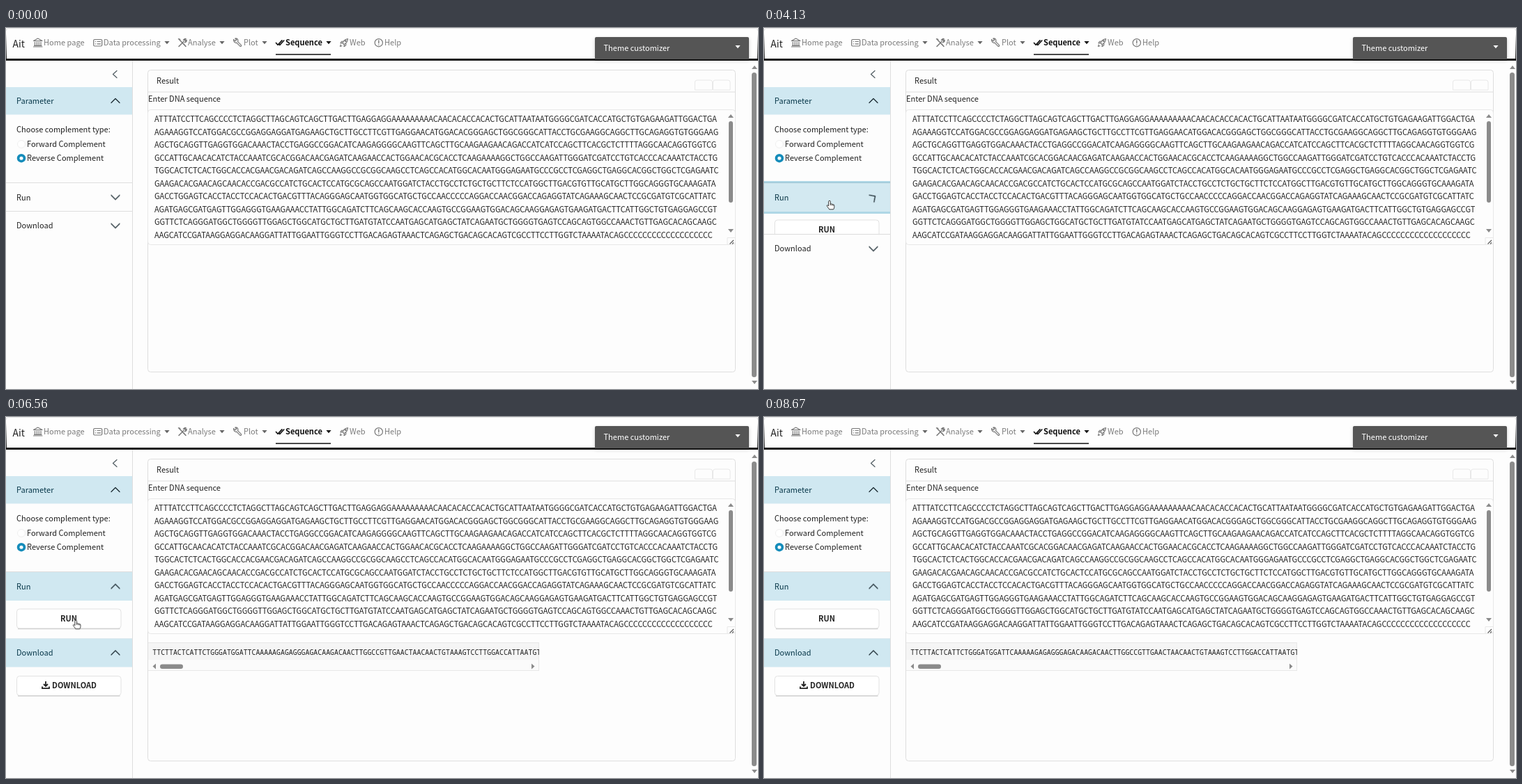
Recreate the animation shown at these times as an HTML page. Size 1079 px wide and 519 px high, loop 9.06 s.

```html
<!DOCTYPE html>
<html lang="en">
<head>
<meta charset="utf-8">
<title>Reverse complement</title>
<style>
html, body { margin: 0; width: 100%; height: 100%; overflow: hidden; background: #fdfdfd; }
svg { display: block; width: 1079px; height: 519px; }
text { font: 11.04px "Noto Sans CJK SC", "Noto Sans CJK JP", "Noto Sans CJK", sans-serif; fill: #222; white-space: pre; }
.bold { font-weight: 700; }
.brand { font-size: 13.8px; }
.mono { font: 500 9.88px "Noto Sans Mono", "DejaVu Sans Mono", monospace; }
.url { font: 8.13px "Noto Sans", "Open Sans", sans-serif; }
.nav text { fill: #7b7b7b; }
.nav .on { fill: #111; }
.open { fill: #08384a; }
.icon { fill: none; stroke: #777; stroke-width: 1.2; stroke-linecap: round; stroke-linejoin: round; }
.line { fill: none; stroke: #dedede; }
.soft { fill: none; stroke: #e8e8e8; }
.bar { fill: #8b8b8b; }
.blue { fill: #d0e8f1; }
.ring { fill: none; stroke: #158cba; stroke-opacity: .33; stroke-width: 3; }
.chev { fill: none; stroke: #1c2b33; stroke-width: 1.3; stroke-linecap: round; stroke-linejoin: round; }
.btn { fill: #fff; stroke: #e2e2e2; }
.hide { opacity: 0; }
</style>
</head>
<body>
<svg viewBox="0 0 1079 519">
  <defs>
    <path id="caret" d="M-3.6-2h7.2L0 2.2z"/>
    <path id="down" d="M-6-3 0 3 6-3"/>
    <linearGradient id="fade" x2="0" y2="1">
      <stop offset="0" stop-color="#111" stop-opacity="0"/>
      <stop offset="1" stop-color="#111"/>
    </linearGradient>
    <filter id="shade" x="-10%" y="-40%" width="120%" height="190%">
      <feDropShadow dx="0" dy="2" stdDeviation="2.5" flood-opacity=".2"/>
    </filter>
    <clipPath id="preClip"><path d="M204 324h561v41H204z"/></clipPath>
  </defs>
  <rect width="1079" height="519" fill="#fdfdfd"/>

  <!-- sidebar -->
  <path class="chev" d="M159 61.5 153.5 66.500 159 71.500" stroke-width="1.2" opacity=".75"/>
  <rect class="blue" y="85" width="181" height="39.500"/>
  <text class="open" x="15" y="109">Parameter</text>
  <use href="#down" class="chev" transform="translate(157 104.500) rotate(180)"/>
  <text x="15" y="150">Choose complement type:</text>
  <circle cx="22" cy="167" r="5.500" fill="#fff" stroke="#f0f0f0"/>
  <text x="30" y="171.200">Forward Complement</text>
  <circle cx="22" cy="187.200" r="6.200" fill="#158cba"/>
  <circle cx="22" cy="187.200" r="2.500" fill="#fff"/>
  <text x="30" y="191.400">Reverse Complement</text>
  <path class="line" d="M0 222.500H181"/>

  <g>
    <rect class="btn" x="15.500" y="276" width="149.500" height="28" rx="4"/>
    <path d="M17 304.500H163.500" stroke="#d2d2d2" stroke-width="1.600"/>
    <text class="bold" x="78" y="293.500">RUN</text>
  </g>
  <g id="dl">
    <rect y="264" width="181" height="255" fill="#fdfdfd"/>
    <path class="line" d="M0 263.500H181"/>
    <rect id="dlBg" class="blue hide" y="264" width="181" height="41"/>
    <text id="dlText" x="15" y="288.400">Download</text>
    <g transform="translate(157 284.400)"><use id="dlChev" href="#down" class="chev"/></g>
    <g>
      <rect class="btn" x="15.500" y="318" width="149.500" height="28" rx="4"/>
      <path d="M17 346.500H163.500" stroke="#d2d2d2" stroke-width="1.600"/>
      <path d="M57 325.500v6.500M54 329.500l3 3 3-3M52 333v2.700h10v-2.700" fill="none" stroke="#222" stroke-width="1.800"/>
      <text class="bold" x="66" y="335.500">DOWNLOAD</text>
    </g>
    <rect id="cover" y="305" width="181" height="120" fill="#fdfdfd"/>
    <rect id="dlRing" class="ring hide" x="-1.500" y="262.500" width="184" height="44"/>
  </g>
  <rect id="runBg" class="blue hide" y="223" width="181" height="41"/>
  <text id="runText" x="15" y="247.800">Run</text>
  <g transform="translate(157 243.500)"><use id="runChev" href="#down" class="chev"/></g>
  <rect id="runRing" class="ring hide" x="-1.500" y="221.500" width="184" height="44"/>
  <rect x="181" y="47" width="898" height="472" fill="#fdfdfd"/>
  <path class="line" d="M181.500 47V519"/>

  <!-- result card -->
  <rect class="line" x="203.500" y="60.500" width="843" height="434" rx="4"/>
  <path class="line" d="M204 92H1046"/>
  <text x="216" y="80">Result</text>
  <path class="soft" d="M988.500 89V78q0-3 3-3h19q3 0 3 3V89zM1014.500 89V78q0-3 3-3h18.500q3 0 3 3V89z"/>
  <text x="204" y="105.700">Enter DNA sequence</text>
  <rect class="soft" x="203.500" y="117.500" width="843" height="194" rx="4"/>
  <g id="dna"></g>
  <g class="bar">
    <path d="M1036 129h8l-4-5zM1036 289h8l-4 5z"/>
    <rect x="1037" y="134" width="6" height="117" rx="3"/>
    <path d="M1070 59h8l-4-5zM1070 507h8l-4 5z"/>
    <rect x="1070" y="64" width="7" height="438" rx="3.500"/>
  </g>
  <path class="soft" d="M1035 311V301.500H1046"/>
  <path d="M1038.500 310.500l5.500-5.500M1042 310.500l2-2" stroke="#555" stroke-width="1.100"/>

  <g id="out" class="hide" clip-path="url(#preClip)">
    <rect x="204" y="324" width="561" height="40" fill="#fbfbfb"/>
    <rect x="204" y="325" width="561" height="24" fill="#f5f5f5"/>
    <rect class="soft" x="203.500" y="324.500" width="561" height="40"/>
    <text class="mono" x="210.300" y="342">TTCTTACTCATTCTGGGATGGATTCAAAAAGAGAGGGAGACAAGACAACTTGGCCGTTGAACTAACAACTGTAAAGTCCTTGGACCATTAATGT</text>
    <g class="bar">
      <path d="M215 354.500v8l-4.500-4zM754 354.500v8l4.500-4z"/>
      <rect x="221" y="355.500" width="33" height="6.500" rx="3.200"/>
    </g>
  </g>

  <!-- top bar -->
  <rect width="1079" height="45" fill="#fefefe"/>
  <path d="M0 4Q0 .5 4 .5H1075Q1079 .5 1079 4" fill="none" stroke="#e6e6e6"/>
  <path d="M0 8h1v38H0zM1078 8h1v38h-1z" fill="url(#fade)"/>
  <rect y="44" width="1079" height="3" fill="#161616"/>
  <text class="brand" x="9.500" y="27.500">Ait</text>
  <g class="nav">
    <text x="54" y="25.400">Home page</text>
    <text x="140" y="25.400">Data processing</text>
    <text x="261" y="25.400">Analyse</text>
    <text x="341" y="25.400">Plot</text>
    <text class="on bold" x="401" y="25.400">Sequence</text>
    <text x="493" y="25.400">Web</text>
    <text x="543" y="25.400">Help</text>
  </g>
  <g fill="#666">
    <use href="#caret" x="231" y="21"/><use href="#caret" x="310" y="21"/>
    <use href="#caret" x="371" y="21"/><use href="#caret" x="463" y="21" fill="#111"/>
  </g>
  <rect x="387" y="37.300" width="79" height="1.500" fill="#111"/>
  <g class="icon">
    <path d="M39.500 18.500 45.700 15l6.300 3.500zM41.500 20v5M44.400 20v5M47.200 20v5M50 20v5M40.500 25.300h10.500M39.500 27h12.500"/>
    <rect x="125.700" y="16.500" width="12" height="9.500" rx="1.500"/>
    <path d="M128.300 19.500h.2M131 19.500h4.500M128.300 22.800h.2M131 22.800h4.500"/>
    <path d="M249 17l8.500 9M247.500 15.800l2 .4.400 2M248 26.500l7-7M254.500 17.500q1-2.500 3.500-2l-1.700 2 1.200 1.200 1.500-1.500q.5 3-2.500 3.500M255 23l3 3.500" stroke-width="1.500"/>
    <path d="M326.500 16.500l2.300 2.300 2-1.800-2-2q3-.5 4 2 .3 1.500-.3 2.600l5 5q.5 2-1.500 1.800l-5.200-5.200q-4 .8-4.300-4.700z"/>
    <path d="M387.500 21.500l2.500 2.800 6-6.500M391.500 23l1.300 1.500 6-6.500" stroke="#111" stroke-width="1.700"/>
    <path d="M483 21.500q2-5 7.500-5.800-.5 5.300-5.500 8zM483 21.300l-3 .6 1.500-2.600 2.600-.3M485.500 23.700l-.5 3 2.500-1.600.3-2.500M480.300 24l-.8 2.500 2.300-.8"/>
    <circle cx="487.300" cy="18.700" r=".8"/>
    <circle cx="534.800" cy="21.200" r="5.600"/>
    <path d="M534.800 18v3.800M534.800 24.200v.1" stroke-width="1.400"/>
  </g>
  <path d="M845 45V15q0-2 2-2h217q2 0 2 2v30z" fill="#555" filter="url(#shade)"/>
  <text x="857.500" y="32.500" style="fill:#fff">Theme customizer</text>
  <use href="#caret" x="1050" y="27" fill="#fff"/>

  <g id="status" class="hide">
    <path d="M0 503H355q3 0 3 3V519H0z" fill="#c9c9c9"/>
    <text class="url" x="3" y="514">127.0.0.1:4656/session/.../reverse_complement-download_fasta?w=</text>
  </g>

  <g id="cursor">
    <path id="arrow" class="hide" d="M0 0V9.700L2.200 7.700 3.800 11.200 5.300 10.500 3.800 7.200H6.700z" fill="#fff" stroke="#222" stroke-width=".9"/>
    <g id="hand" class="hide" fill="#fff" stroke="#222" stroke-width=".9" stroke-linejoin="round">
      <path d="M-1.300 8V1.300Q-1.300.3 0 .3T1.300 1.300V5Q2.600 4.200 3.300 5.300 4.600 4.700 5.100 5.900 6.800 5.600 6.800 7.300V9.500Q6.800 11 5.700 12.800H-.3Q-1.300 11-3.400 8.500-4.200 7.200-3.300 6.700-2.400 6.500-1.300 8z"/>
      <path d="M1.300 5V7M3.300 5.500V7.200M5.100 6V7.500" fill="none"/>
    </g>
  </g>
</svg>
<script>
const LOOP = 9060;
const $ = id => document.getElementById(id);

const rows = [
  'ATTTATCCTTCAGCCCCTCTAGGCTTAGCAGTCAGCTTGACTTGAGGAGGAAAAAAAAACAACACACCACACTGCATTAATAATGGGGCGATCACCATGCTGTGAGAAGATTGGACTGA',
  'AGAAAGGTCCATGGACGCCGGAGGAGGATGAGAAGCTGCTTGCCTTCGTTGAGGAACATGGACACGGGAGCTGGCGGGCATTACCTGCGAAGGCAGGCTTGCAGAGGTGTGGGAAG',
  'AGCTGCAGGTTGAGGTGGACAAACTACCTGAGGCCGGACATCAAGAGGGGCAAGTTCAGCTTGCAAGAAGAACAGACCATCATCCAGCTTCACGCTCTTTTAGGCAACAGGTGGTCG',
  'GCCATTGCAACACATCTACCAAATCGCACGGACAACGAGATCAAGAACCACTGGAACACGCACCTCAAGAAAAGGCTGGCCAAGATTGGGATCGATCCTGTCACCCACAAATCTACCTG',
  'TGGCACTCTCACTGGCACCACGAACGACAGATCAGCCAAGGCCGCGGCAAGCCTCAGCCACATGGCACAATGGGAGAATGCCCGCCTCGAGGCTGAGGCACGGCTGGCTCGAGAATC',
  'GAAGACACGAACAGCAACACCGACGCCATCTGCACTCCATGCGCAGCCAATGGATCTACCTGCCTCTGCTGCTTCTCCATGGCTTGACGTGTTGCATGCTTGGCAGGGTGCAAAGATA',
  'GACCTGGAGTCACCTACCTCCACACTGACGTTTACAGGGAGCAATGGTGGCATGCTGCCAACCCCCAGGACCAACGGACCAGAGGTATCAGAAAGCAACTCCGCGATGTCGCATTATC',
  'AGATGAGCGATGAGTTGGAGGGTGAAGAAACCTATTGGCAGATCTTCAGCAAGCACCAAGTGCCGGAAGTGGACAGCAAGGAGAGTGAAGATGACTTCATTGGCTGTGAGGAGCCGT',
  'GGTTCTCAGGGATGGCTGGGGTTGGAGCTGGCATGCTGCTTGATGTATCCAATGAGCATGAGCTATCAGAATGCTGGGGTGAGTCCAGCAGTGGCCAAACTGTTGAGCACAGCAAGC',
  'AAGCATCCGATAAGGAGGACAAGGATTATTGGAATTGGGTCCTTGACAGAGTAAACTCAGAGCTGACAGCACAGTCGCCTTCCTTGGTCTAAAATACAGCCCCCCCCCCCCCCCCCCC'
];
rows.forEach((row, i) => {
  const el = document.createElementNS('http://www.w3.org/2000/svg', 'text');
  el.setAttribute('x', 213);
  el.setAttribute('y', 135.1 + i * 18.5);
  el.textContent = row;
  $('dna').append(el);
});

// steps: [ms, value, easing towards the next step]
const start = document.timeline.currentTime;
function play(id, prop, steps, ease = 'linear') {
  const all = [[0, steps[0][1]], ...steps, [LOOP, steps[steps.length - 1][1]]];
  const keys = all.map(([ms, value, easing = ease]) => ({ offset: ms / LOOP, [prop]: value, easing }));
  const run = $(id).animate(keys, { duration: LOOP, iterations: Infinity });
  run.startTime = start;
}
const tween = (id, prop, at, len, from, to, ease) =>
  play(id, prop, [[at, from, ease], [at + len, to]]);
const show = (id, steps) =>
  play(id, 'opacity', [[0, 0], ...steps], 'step-end');

// accordion sections
const RUN = 4008, LOAD = 5557;
for (const [name, at, off] of [['run', RUN, LOAD - 20], ['dl', LOAD, 6190]]) {
  tween(name + 'Bg', 'opacity', at, 150, 0, 1, 'ease-in-out');
  tween(name + 'Text', 'fill', at, 150, '#222', '#08384a', 'ease-in-out');
  tween(name + 'Chev', 'transform', at, 200, 'rotate(0deg)', 'rotate(-180deg)', 'ease-in-out');
  play(name + 'Ring', 'opacity', [[at - 18, 0], [at + 120, 1], [off, 1], [off + 100, 0]]);
}
tween('dl', 'transform', RUN, 350, 'translateY(0px)', 'translateY(54.5px)', 'ease');
tween('cover', 'transform', LOAD, 350, 'translateY(0px)', 'translateY(54.5px)', 'ease');

show('out', [[6400, 1]]);
play('status', 'opacity', [[7360, 0], [7450, 1], [7930, 1], [8050, 0]]);

// pointer
const soft = 'ease-in-out';
const path = [
  [230, 880, -16, 'ease-out'], [700, 146, 157],
  [980, 146, 157, 'ease-in'], [1400, 88, 190], [1680, 108, 218], [1830, 102, 257],
  [2120, 102, 257, soft], [2350, 103, 246],
  [2580, 103, 246, soft], [3000, 61, 175], [3140, 54, 169],
  [3370, 54, 169, soft], [3510, 94, 256],
  [3660, 94, 256, soft], [3800, 94, 248],
  [4920, 94, 248, soft], [5250, 100, 296], [5500, 102, 348],
  [5850, 102, 348, soft], [6000, 99, 290],
  [6500, 99, 290, 'ease-in'], [6750, 112, 310], [6950, 146, 389], [7080, 123, 388], [7220, 123, 386],
  [7730, 123, 386, 'ease-in'], [8000, 330, 310], [8200, 640, 180], [8400, 905, 57], [8620, 1021, -16]
];
play('cursor', 'transform', path.map(([ms, x, y, ease]) => [ms, `translate(${x}px, ${y}px)`, ease]));
show('arrow', [[230, 1], [1930, 0], [6750, 1], [7180, 0], [7780, 1], [8620, 0]]);
show('hand', [[1930, 1], [6750, 0], [7180, 1], [7780, 0]]);
</script>
</body>
</html>
```
